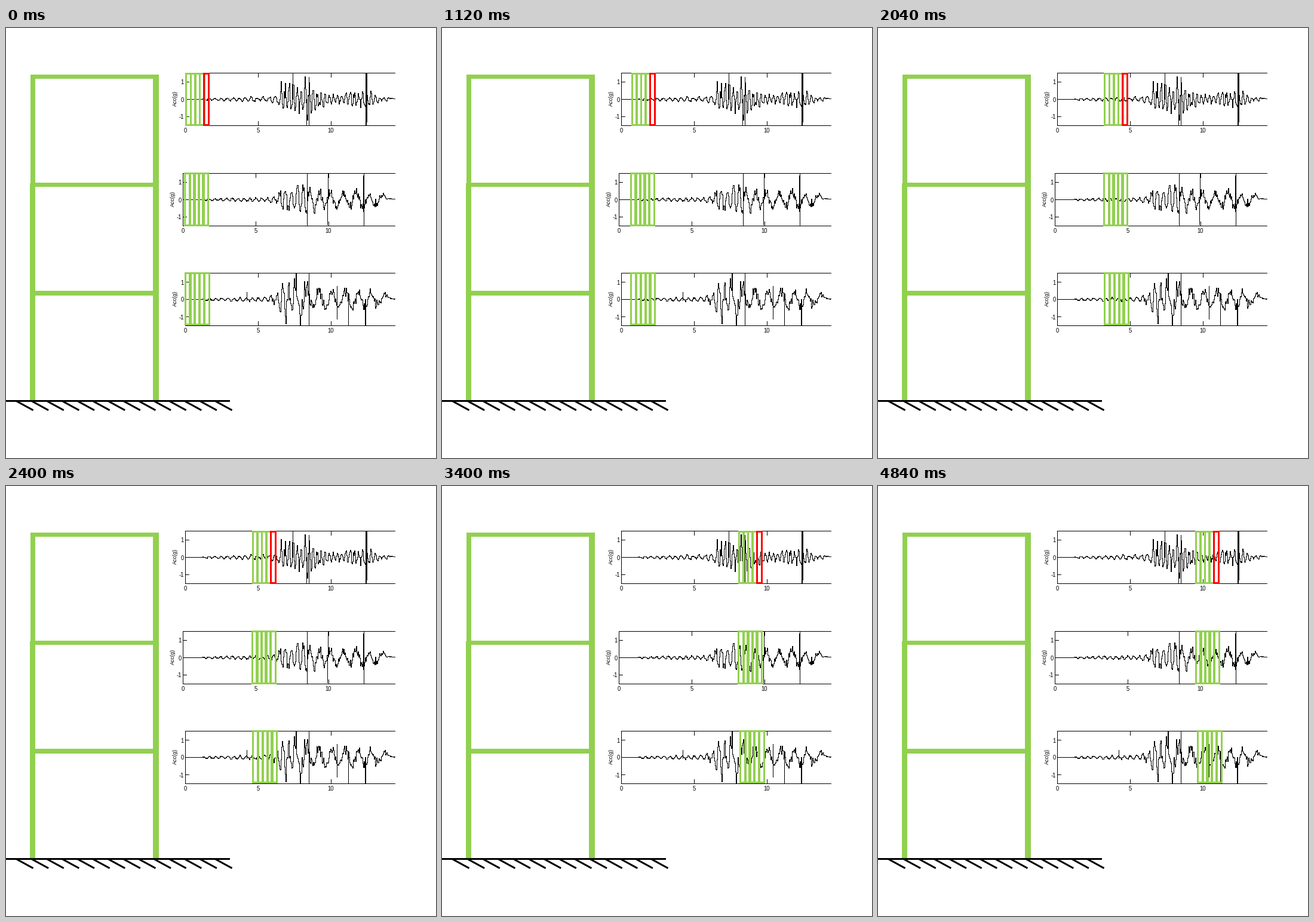
Write a matplotlib script that moves like this. It is 720x720 px and loops after 4920 ms.

```python
import numpy as np
import matplotlib.pyplot as plt
from matplotlib.animation import FuncAnimation
from matplotlib.patches import Rectangle

SIZE, FRAMES, STEP = 720, 123, 40
GREEN, RED = "#92d050", "#ff0000"
HALF = 44            # half height of a plot in pixels
SEC, G = 24.4, 29.3  # pixels per second and per g
RIGHT = 652

plt.rcParams["font.family"] = "Liberation Sans"
fig = plt.figure(figsize=(SIZE / 72, SIZE / 72), dpi=72, facecolor="white")
ax = fig.add_axes([0, 0, 1, 1])
ax.set(xlim=(0, SIZE), ylim=(SIZE, 0))
ax.axis("off")


def line(xs, ys, width=1, **style):
    style = {"antialiased": False, "solid_joinstyle": "miter", **style}
    ax.plot(xs, ys, color="black", lw=width, snap=False,
            solid_capstyle="butt", **style)


def block(x0, y0, x1, y1):
    ax.add_patch(Rectangle((x0, y0), x1 - x0, y1 - y0, fc=GREEN, lw=0))


def draw_building():
    block(41, 78, 49, 262)
    block(40, 260, 49, 623)
    block(246, 78, 256, 623)
    for top, bottom in ((78, 85), (259, 266), (440, 448)):
        block(41, top, 256, bottom)
    line([0, 375], [624.5, 624.5], 3)
    for x in np.linspace(18, 351, 14):
        line([x, x + 27.5], [625, 640], 3, antialiased=True)


def draw_axes(left, mid):
    top, bottom = mid - HALF, mid + HALF
    for y in (top, bottom):
        line([left, RIGHT], [y, y])
    line([left, left], [top, bottom])
    for sec in (0, 5, 10):
        x = np.floor(left + sec * SEC) + 0.5
        if sec:
            line([x, x], [top, top + 7])
            line([x, x], [bottom, bottom - 7])
        ax.text(x - 0.5, bottom + 7.5, str(sec), size=9.5, ha="center",
                va="center_baseline")
    for value in (1, 0, -1):
        y = np.floor(mid - value * G) + 0.5
        line([left, left + 6], [y, y])
        ax.text(left - 3, y, str(value), size=9.5, ha="right",
                va="center_baseline")
    ax.text(left - 17.5, mid - 1.5, "Acc(g)", size=9, rotation=90,
            ha="center", va="center")


def draw_wave(left, mid, cycles, swell, spikes, seed):
    """Noisy oscillation; cycles and swell give phase and size at a few x."""
    rng = np.random.default_rng(seed)
    xs = np.arange(np.ceil(left), RIGHT + 1)
    phase = np.interp(xs, *zip((300, -16), *cycles))
    size = np.interp(xs, *zip((325, 0.2), (335, 1.5), (440, 4), *swell, (RIGHT, 1)))
    shape = 0.85 * np.cos(2 * np.pi * phase) + 0.3 * rng.standard_normal(xs.size)
    ys = mid - np.clip(size * shape, -HALF, HALF)
    line(xs, np.floor(ys) + 0.5, drawstyle="steps-mid")
    for x, up, down in spikes:
        line([x, x], [mid - up, mid + down])


draw_building()
for left, mid in ((300.5, 119.5), (296.5, 287.5), (300.5, 454.5)):
    draw_axes(left, mid)

draw_wave(300.5, 119.5,
          cycles=[(461, 0), (541, 12), (640, 26)],
          swell=[(456, 6), (461, 27), (485, 20), (505, 30), (530, 13),
                 (550, 5), (575, 13), (612, 12), (625, 4)],
          spikes=[(480.5, 44, 0), (503.5, 0, 44), (507.5, 37, 44),
                  (602.5, 44, 44), (603.5, 44, 44), (604.5, 44, 38)], seed=3)
draw_wave(296.5, 287.5,
          cycles=[(458, 0), (508, 5), (543, 7), (630, 11)],
          swell=[(455, 5), (460, 15), (480, 14), (495, 22), (515, 14),
                 (600, 14), (632, 8), (638, 2)],
          spikes=[(504.5, 44, 44), (538.5, 0, 42), (539.5, 44, 0),
                  (598.5, 40, 20), (599.5, 44, 44)], seed=8)
draw_wave(300.5, 454.5,
          cycles=[(464, 0), (484, 2), (503, 3), (634, 9)],
          swell=[(455, 10), (465, 36), (477, 18), (493, 40), (505, 28),
                 (518, 15), (560, 18), (634, 12), (640, 3)],
          spikes=[(403.5, 12, 2), (507.5, 44, 44), (554.5, 22, 33),
                  (573.5, 10, 44), (601.5, 0, 44), (602.5, 0, 44)], seed=5)


def progress(frame):
    """Speed follows a squared sine: slow start, fast middle, slow stop."""
    u = frame / (FRAMES - 1)
    return u - np.sin(2 * np.pi * u) / (2 * np.pi)


# start x, travel, pitch, box width, top, height
ROWS = [(301, 231, 7.5, 8, 76.5, 86),
        (299, 233, 7.5, 9, 243.5, 87),
        (299.5, 235.5, 7.75, 9, 410.5, 86)]
boxes = []
for row, (start, travel, pitch, width, top, height) in enumerate(ROWS):
    for i in range(5):
        color = RED if row == 0 and i == 4 else GREEN
        box = Rectangle((start, top), width, height, fill=False, ec=color, lw=3,
                        antialiased=False, snap=False, joinstyle="miter", zorder=5)
        ax.add_patch(box)
        boxes.append((box, start + pitch * i, travel))


def update(frame):
    done = progress(frame)
    for box, x, travel in boxes:
        box.set_x(np.floor(x + travel * done + 0.5) + 0.5)
    return [box for box, _, _ in boxes]


anim = FuncAnimation(fig, update, frames=FRAMES, interval=STEP, repeat=True,
                     repeat_delay=0, blit=False)
plt.show()
```
